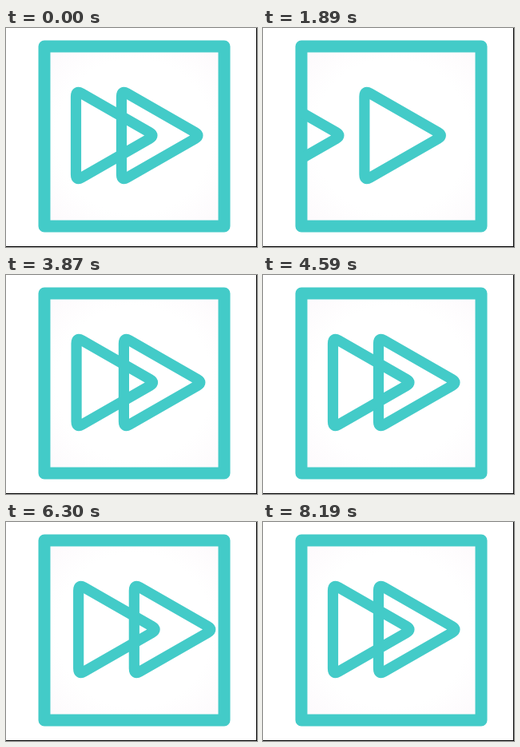
These frames come from a looping animation (314 by 274 pixels, 8.64 s). An HTML page:

```html
<!DOCTYPE html>
<html>
<head>
<meta charset="utf-8">
<style>
html, body { margin: 0; width: 100%; height: 100%; overflow: hidden; background: #fff; }
svg { display: block; }
</style>
</head>
<body>
<svg width="314" height="274" viewBox="0 0 314 274">
  <defs>
    <radialGradient id="glow" r=".72">
      <stop offset=".6" stop-color="#fff"/>
      <stop offset="1" stop-color="#fcf8fb"/>
    </radialGradient>
    <clipPath id="inside"><rect x="48" y="23" width="225" height="225"/></clipPath>
    <path id="arrow" d="M87.5 85.8Q87.5 77.8 94.4 81.8L179.5 130.5Q186.4 134.5 179.5 138.5L94.4 187.2Q87.5 191.2 87.5 183.2Z"/>
  </defs>
  <g fill="none" stroke="#43cbc8" stroke-width="13.2" stroke-linejoin="round">
    <rect x="48" y="23" width="225" height="225" fill="url(#glow)" stroke-width="15"/>
    <g clip-path="url(#inside)">
      <use href="#arrow"/>
      <use href="#arrow"/>
      <use href="#arrow"/>
    </g>
  </g>
  <path d="M313 0h1v274H0v-1h313Z"/>
</svg>
<script>
const STEP = 90, LOOP = 8640;
// Run timing, counted in steps
const START = 2.98, PERIOD = 13.2, MOVE = 8.3;
const GAP = 57, FLIGHT = 285, WRAP = FLIGHT + GAP;
const [rear, front, incoming] = document.querySelectorAll('use');

const ease = x => x * x * (4.2 - 4.4 * x + 1.2 * x * x);
const place = (arrow, x) => arrow.setAttribute('transform', `translate(${x})`);

function draw(now) {
  const since = Math.floor(now % LOOP / STEP) - START;
  const p = since < 0 ? 0 : ease(Math.min(1, since % PERIOD / MOVE));
  const x = GAP + FLIGHT * p;
  place(rear, GAP * p);
  // The front arrow leaves on the right and returns from the left
  place(front, x);
  place(incoming, x - WRAP);
}

let first;
function tick(now) {
  first ??= now;
  draw(now - first);
  requestAnimationFrame(tick);
}
draw(0);
requestAnimationFrame(tick);
</script>
</body>
</html>
```
